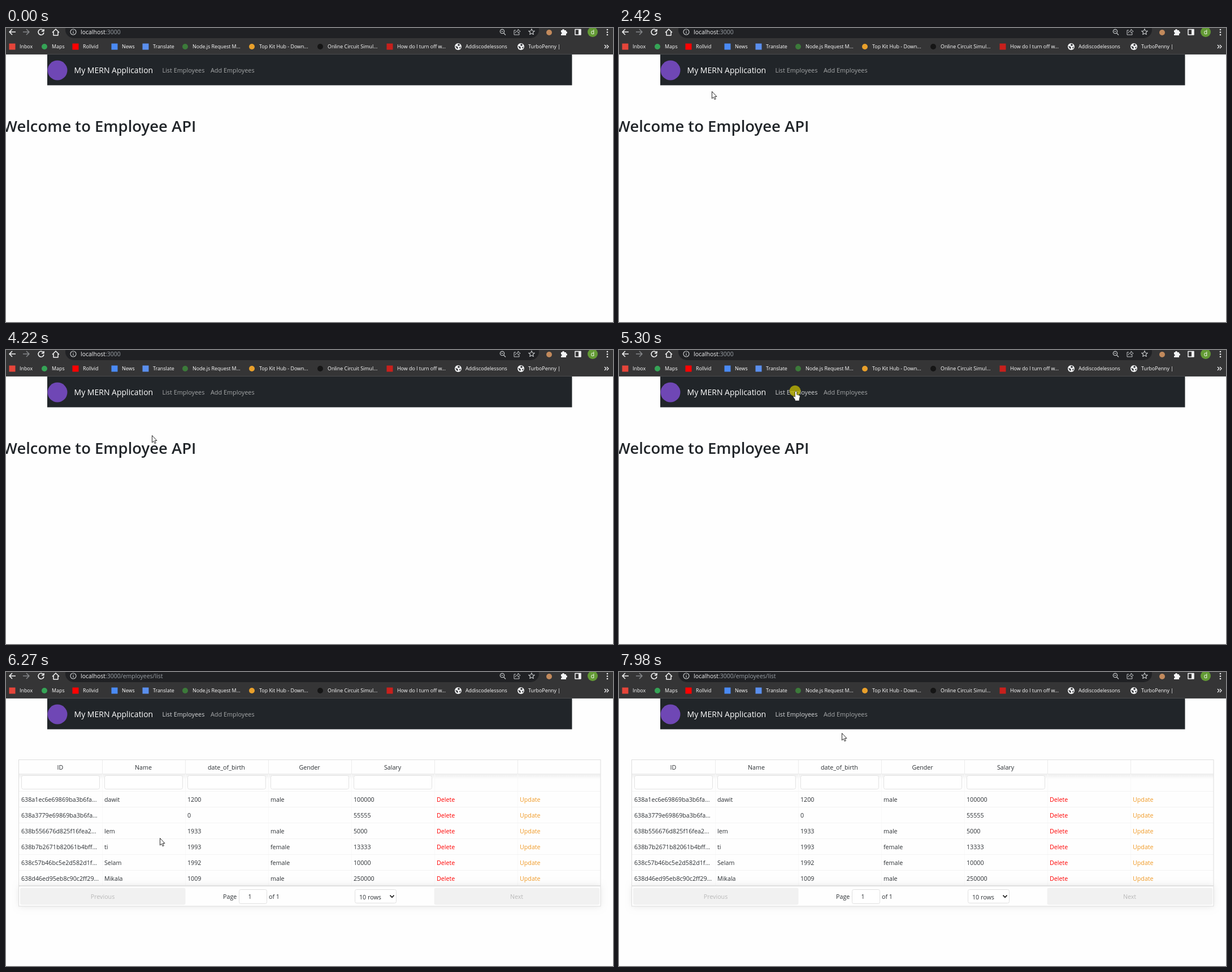
An HTML page with a canvas for the animation above (8000 ms loop, 1074 by 521 pixels).

```html
<!DOCTYPE html>
<html lang="en">
<head>
<meta charset="utf-8">
<title>Employee list</title>
<style>
html, body { margin: 0; width: 100%; height: 100%; overflow: hidden; background: #fefefe; }
canvas { display: block; }
</style>
</head>
<body>
<canvas id="stage" width="1074" height="521"></canvas>
<script>
const ctx = document.getElementById('stage').getContext('2d');
const LOOP = 8000;
const FONT = '"Open Sans", "Noto Sans", sans-serif';

function text(str, x, y, size, color, align = 'left', weight = 400) {
  ctx.font = `${weight} ${size}px ${FONT}`;
  ctx.fillStyle = color;
  ctx.textAlign = align;
  ctx.fillText(str, x, y);
  return ctx.measureText(str).width;
}
function rect(x, y, w, h, color) {
  ctx.fillStyle = color;
  ctx.fillRect(x, y, w, h);
}
function round(x, y, w, h, r, fill, stroke) {
  ctx.beginPath();
  ctx.roundRect(x, y, w, h, r);
  ctx.fillStyle = fill;
  ctx.fill();
  if (stroke) {
    ctx.strokeStyle = stroke;
    ctx.lineWidth = 1;
    ctx.stroke();
  }
}
function disc(x, y, r, color) {
  ctx.beginPath();
  ctx.arc(x, y, r, 0, 7);
  ctx.fillStyle = color;
  ctx.fill();
}
function ring(x, y, r, color) {
  ctx.beginPath();
  ctx.arc(x, y, r, 0, 7);
  ctx.strokeStyle = color;
  ctx.lineWidth = 1.2;
  ctx.stroke();
}
function shape(d, x, y, fill, stroke, width = 1) {
  const p = new Path2D(d);
  ctx.save();
  ctx.translate(x, y);
  if (fill) { ctx.fillStyle = fill; ctx.fill(p); }
  if (stroke) {
    ctx.strokeStyle = stroke;
    ctx.lineWidth = width;
    ctx.lineJoin = 'round';
    ctx.stroke(p);
  }
  ctx.restore();
}
function star(x, y, r) {
  const pts = Array.from({ length: 10 }, (_, i) => {
    const a = i * Math.PI / 5, d = i % 2 ? r * .45 : r;
    return [d * Math.sin(a), -d * Math.cos(a)];
  });
  shape('M' + pts.join('L') + 'Z', x, y, null, LIGHT, 1.1);
}

// ---- browser bar ----
const WHITE = '#f3f4f5', LIGHT = '#c4c7c9', DIM = '#9aa0a6';
const BOOKMARKS = [
  [11, 'Inbox', 'square', '#e5453a'],
  [68, 'Maps', 'disc', '#35a456'],
  [123, 'Rollvid', 'square', '#f00'],
  [192, 'News', 'square', '#4a8af4'],
  [247, 'Translate', 'square', '#5a8fee'],
  [317, 'Node.js Request M...', 'disc', '#3c7a3a'],
  [435, 'Top Kit Hub - Down...', 'disc', '#e9a02b'],
  [556, 'Online Circuit Simul...', 'disc', '#151515'],
  [679, 'How do I turn off w...', 'square', '#c8201c'],
  [800, 'Addiscodelessons', 'globe'],
  [911, 'TurboPenny |', 'globe']
];

function globe(x, y) {
  disc(x, y, 6, WHITE);
  shape('M-5 -1L-1 0L0 3L-2 4ZM0 -5L3 -4L2 -1L-1 -2ZM2 1L5 0L3 4Z', x, y, '#35363a');
}

function browser(url) {
  rect(0, 0, 1074, 46, '#353536');
  rect(0, 46, 1074, 1, '#4a4b4d');
  round(105, -12, 838, 30, 15, '#202124');

  const arrow = 'M6 0H-5M0 -5L-5 0L0 5';
  shape(arrow, 11, 7, null, WHITE, 1.6);
  ctx.save();
  ctx.scale(-1, 1);
  shape(arrow, -36, 7, null, '#85878a', 1.5);
  ctx.restore();
  shape('M4.2 -2.6A5 5 0 1 0 5 1M5 -5V-1.4H1', 62, 7, null, WHITE, 1.6);
  shape('M-6 1L0 -5L6 1M-4 0V6H4V0', 88, 7, null, WHITE, 1.5);
  ring(119, 7, 5, LIGHT);
  shape('M0 -1V3M0 -3V-2', 119, 7, null, LIGHT, 1.1);

  const w = text('localhost', 132, 11, 10.5, WHITE);
  text(url, 132 + w, 11, 10.5, DIM);

  ring(878, 6, 3.7, LIGHT);
  shape('M1.5 2L5 5.5M-3 -1H.8', 879, 7, null, LIGHT, 1.2);
  shape('M-2 -3H-5V5H4V2M-3 2Q-2 -2 2 -2V-5L6 -1L2 2V-.5', 904, 7, null, LIGHT);
  star(930, 7, 5.6);
  disc(961, 8, 5, '#c28a5c');
  rect(982, 4, 9, 9, WHITE);
  disc(986, 4, 2, WHITE);
  disc(991, 8, 2, WHITE);
  disc(982, 9, 1.6, '#353536');
  shape('M-5 -4.5H5V5H-5Z', 1012, 7, null, WHITE, 1.5);
  rect(1013, 2, 4, 10, WHITE);
  disc(1038, 7, 9, '#639a35');
  text('d', 1038, 11, 10.5, '#fff', 'center');
  for (let i = 0; i < 3; i++) disc(1064, 3 + i * 4.5, 1.3, WHITE);

  for (const [x, name, kind, color] of BOOKMARKS) {
    if (kind === 'globe') globe(x, 33);
    else if (kind === 'disc') disc(x, 33, 5, color);
    else rect(x - 5.5, 27.5, 11, 11, color);
    text(name, x + 13, 36, 8.9, '#fff');
  }
  shape('M-3 -3L0 0L-3 3M1 -3L4 0L1 3', 1062, 33, null, WHITE, 1.4);
}

function navbar(lit) {
  const link = '#a6a8a9';
  rect(73, 47, 928.5, 54.5, '#212529');
  disc(91, 75, 17.5, '#6f47b5');
  text('My MERN Application', 120.5, 80, 14, '#fff');
  text('List Employees', 276.5, 79, 10.85, lit ? '#d6d7d8' : link);
  text('Add Employees', 362, 79, 10.85, link);
}

// ---- table ----
const LEFT = 22.5, RIGHT = 1052, WIDE = RIGHT - LEFT, COL = 147, ROW = 28, TOP = 155;
const HEADS = ['ID', 'Name', 'date_of_birth', 'Gender', 'Salary'];
const ROWS = [
  '638a1ec6e69869ba3b6fa...|dawit|1200|male|100000',
  '638a3779e69869ba3b6fa...||0||55555',
  '638b556676d825f16fea2...|lem|1933|male|5000',
  '638b7b2671b82061b4bff...|ti|1993|female|13333',
  '638c57b46bc5e2d582d1f...|Selam|1992|female|10000',
  '638d46ed95eb8c90c2ff29...|Mikala|1009|male|250000'
].map(s => s.split('|'));
const BODY = '#2b2f33', EDGE = '#e0e0e0', SIZE = 10.7;

function heading(foot) {
  const g = ctx.createLinearGradient(0, 180, 0, 190);
  g.addColorStop(0, 'rgba(0,0,0,.07)');
  g.addColorStop(1, 'rgba(0,0,0,0)');
  rect(LEFT, 180, WIDE, 10, g);
  for (let i = 0; i < 7; i++) {
    const x = Math.round(LEFT + i * COL);
    if (i) {
      rect(x, TOP, 1, 25, '#ececec');
      rect(x, 181, 1, foot - 181, '#f8f8f8');
    }
    if (i < HEADS.length) {
      text(HEADS[i], LEFT + COL * (i + .5), 173, SIZE, BODY, 'center');
      round(x + 4.5, 183.5, 138, 24, 3, '#fff', '#e2e2e2');
    }
  }
}

function pager(foot) {
  const base = foot + 22.5;
  ctx.save();
  ctx.shadowColor = 'rgba(0,0,0,.1)';
  ctx.shadowBlur = 11;
  rect(LEFT, foot, WIDE, 36, '#fefefe');
  ctx.restore();
  rect(LEFT, foot - 1, WIDE, 2, EDGE);
  for (const [name, x] of [['Previous', 25], ['Next', 757.5]]) {
    round(x, foot + 3.5, 292.5, 30, 3, '#f1f1f1');
    text(name, x + 146, base, SIZE, '#b9b9b9', 'center');
  }
  text('Page', 384, base, SIZE, BODY);
  round(412.5, foot + 6.5, 49, 25, 3, '#fff', EDGE);
  text('1', 431.5, base, SIZE, BODY, 'center');
  text('of 1', 465, base, SIZE, BODY);
  round(617.5, foot + 6.5, 73, 24, 3, '#fff', EDGE);
  text('10 rows', 625, base + 1, SIZE, BODY);
  shape('M-3.5 -1.8L0 1.8L3.5 -1.8', 683, foot + 18.5, null, '#222', 1.7);
}

function table(rows, count, veil, loadY) {
  const foot = 211 + count * ROW, high = foot + 36 - TOP;
  heading(foot);
  for (let r = 0; r < count; r++) {
    const y = 211 + r * ROW, base = y + 18.5;
    rect(LEFT, y, WIDE, 1, '#f3f3f3');
    if (!rows[r]) continue;
    rows[r].forEach((s, i) => text(s, LEFT + 4.5 + i * COL, base, SIZE, BODY));
    text('Delete', LEFT + 4.5 + 5 * COL, base, SIZE, '#f00');
    text('Update', LEFT + 4.5 + 6 * COL, base, SIZE, '#f09a26');
  }
  pager(foot);
  if (veil > 0) {
    rect(LEFT, TOP, WIDE, high, `rgba(255,255,255,${veil * .8})`);
    text('Loading...', 537.5, loadY, SIZE, `rgba(0,0,0,${veil * .72})`, 'center');
  }
  ctx.strokeStyle = '#dedede';
  ctx.lineWidth = 1;
  ctx.strokeRect(LEFT, TOP + .5, WIDE, high - .5);
}

// ---- pointer: start time, end time, points on the way from the last place ----
const STEP = 68;
const ENTRY = [800, 505];
const MOVES = [
  [590, 1000, [722, 430], [736, 379]],
  [1400, 1610, [303, 324]],
  [1810, 2420, [47, 165], [164, 112]],
  [2480, 2550, [182, 60]],
  [2620, 2620, [188, 55]],
  [2880, 3010, [179, 72], [184, 63]],
  [3340, 3340, [174, 61]],
  [3480, 3480, [184, 70]],
  [3680, 4360, [72, 140], [200, 198], [312, 84]],
  [4560, 4630, [313, 73]],
  [5790, 6270, [272, 294]],
  [6340, 6480, [240, 305]],
  [6550, 7290, [112, 305], [150, 246], [226, 292]],
  [7360, 7640, [306, 339]],
  [7840, 7980, [412, 190], [394, 108]]
];

// Catmull-Rom curve through evenly timed points
function spline(pts, u) {
  const n = pts.length - 1;
  const i = Math.min(n - 1, Math.floor(u * n)), f = u * n - i;
  const at = k => pts[Math.max(0, Math.min(n, k))];
  const [a, b, c, d] = [at(i - 1), at(i), at(i + 1), at(i + 2)];
  return [0, 1].map(k => b[k] + f / 2 * (c[k] - a[k]
    + f * (2 * a[k] - 5 * b[k] + 4 * c[k] - d[k] + f * (3 * (b[k] - c[k]) + d[k] - a[k]))));
}

function pointer(t) {
  const i = MOVES.findLastIndex(m => t >= m[0]);
  if (i < 0) return null;
  const [from, to, ...pts] = MOVES[i];
  const start = i ? MOVES[i - 1].at(-1) : ENTRY;
  const steps = Math.round((to - from) / STEP) + 1;
  const done = Math.min(steps, Math.floor((t - from) / STEP + .1) + 1);
  return spline([start, ...pts], done / steps).map(Math.round);
}

const ARROW = 'M.5 .5V13L3.3 10.4L5.2 14.7L7.2 13.8L5.3 9.6H9Z';
const HAND = 'M-1.5 1Q0 -.8 1.5 1V6L6 7.2Q7.5 7.8 7.2 9.5L6 14V17H-1.5V15L-4.5 10.5Q-4.8 8.8 -3 9L-1.5 10.3Z';

function draw(t) {
  const pos = pointer(t);
  const hover = pos && pos[0] > 271 && pos[0] < 357 && pos[1] > 59 && pos[1] < 91;

  rect(0, 0, 1074, 521, '#fefefe');
  browser(t < 5430 ? ':3000' : ':3000/employees/list');
  navbar(hover || t >= 5300);

  if (t < 5570) {
    text('Welcome to Employee API', -6, 184, 27.45, '#212529', 'left', 600);
  } else if (t < 5720) {
    table([], 4, 1, 274);
  } else {
    const fade = Math.min(1, Math.floor((t - 5720) / 70) / 4);
    table(ROWS, 6, .7 * (1 - fade), 301.5 - 18 * fade);
  }

  if (t >= 5300 && t < 5430) disc(311.5, 72.5, 9.8, 'rgba(205,196,0,.72)');
  if (pos) shape(hover ? HAND : ARROW, pos[0], pos[1], '#fff', '#111', hover ? .6 : .9);
}

function tick(now) {
  draw(now % LOOP);
  requestAnimationFrame(tick);
}
draw(0);
requestAnimationFrame(tick);
</script>
</body>
</html>
```
